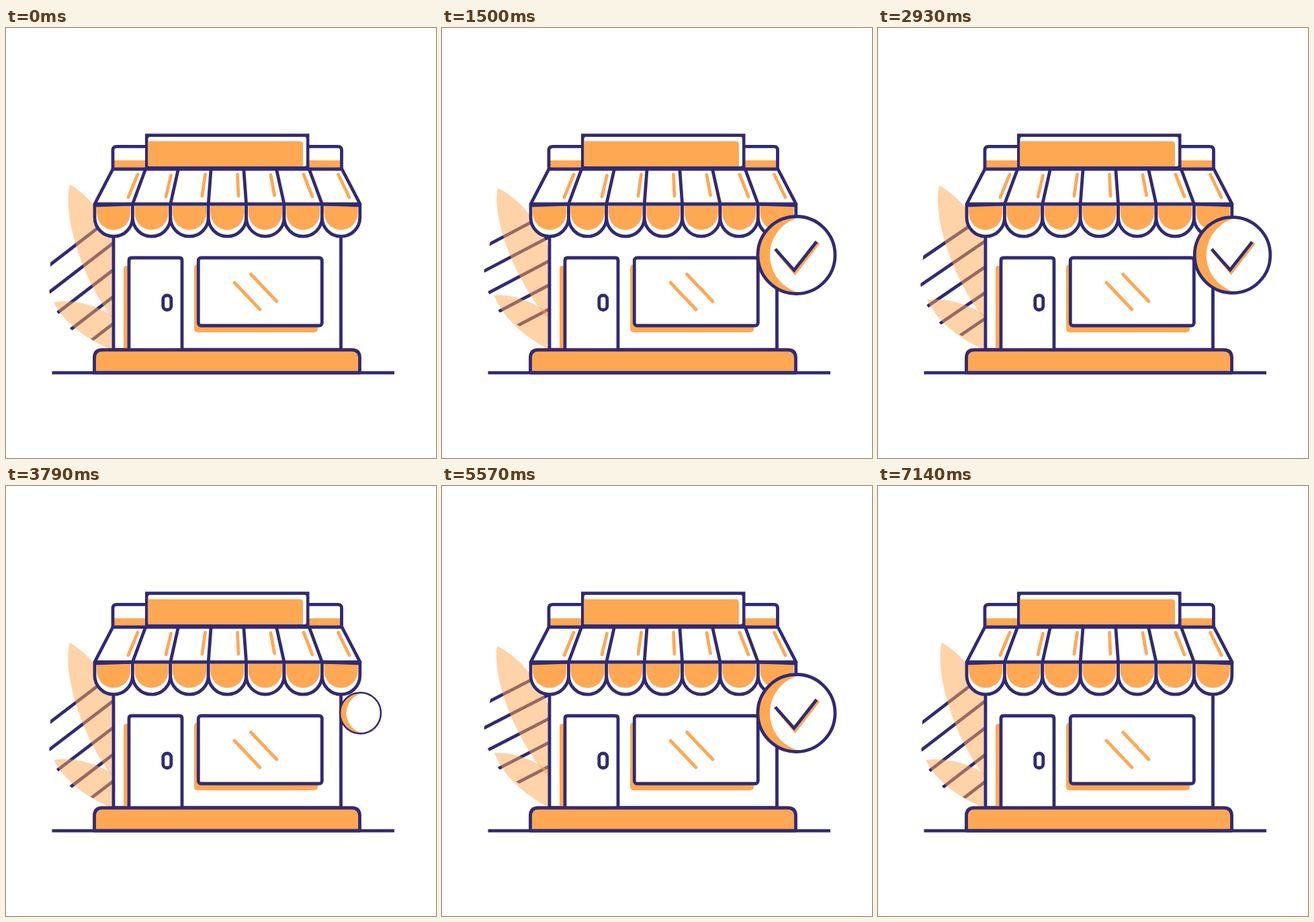
An HTML page for the animation above (7.21 s loop, 640 by 640 pixels).

```html
<!DOCTYPE html>
<html lang="en">
<head>
<meta charset="utf-8">
<title>Shop</title>
<style>
  html, body { margin: 0; width: 100%; height: 100%; overflow: hidden; background: #fff; }
  svg { display: block; width: 100%; height: 100%; }
  .ink { fill: none; stroke: #302a74; stroke-width: 4.8; }
  .paper { fill: #fff; }
  .fill { fill: #ffa853; }
  .shine { fill: none; stroke: #ffa853; stroke-width: 4.8; stroke-linecap: round; }
  .leaf { fill: #ffa853; opacity: .5; }
  .round { stroke-linejoin: round; stroke-linecap: round; }
</style>
</head>
<body>
<svg viewBox="0 0 640 640">
  <defs>
    <clipPath id="hatchClip"><path d="M75 270L66 350L64.5 393L76 423L97 449L129 464.5L220 490V200Z"/></clipPath>
    <clipPath id="badgeClip"><circle cx="527.5" cy="338" r="57"/></clipPath>
  </defs>

  <g id="hatch"><g clip-path="url(#hatchClip)"><path id="hatchLines" class="ink"/></g></g>
  <path id="tallLeaf" class="leaf" d="M95 233C135 255 195 330 170 445C125 400 82 290 95 233Z"/>
  <path id="lowLeaf" class="leaf" d="M71 408C110 402 155 420 180 445L175 486C130 470 90 445 71 408Z"/>

  <!-- Walls, door and window -->
  <path class="ink paper" d="M160 280V479H498.500V280"/>
  <path class="fill" d="M175 479V358Q175 354 179 354H190V479Z"/>
  <path class="ink paper" d="M183 479V346Q183 342 187 342H258Q262 342 262 346V479"/>
  <rect class="ink" x="233.800" y="398" width="12" height="21.500" rx="5.500"/>
  <rect class="fill" x="280" y="352" width="184" height="101" rx="5"/>
  <rect class="ink paper" x="286.300" y="342" width="184" height="101" rx="4"/>
  <path class="shine" d="M340 379L378 419M364.500 366.500L403 407"/>

  <!-- Base -->
  <path class="ink" d="M68.500 513.200H578"/>
  <path class="ink fill round" d="M131.500 513V491Q131.500 479 143.500 479H514.500Q526.500 479 526.500 491V513Z"/>

  <!-- Roof and sign -->
  <path class="paper" d="M159 210V176H500V210Z"/>
  <path class="fill" d="M160 197H499V209H160Z"/>
  <path class="ink" d="M159 210V182Q159 176.300 165 176.300H494Q499.500 176.300 499.500 182V210"/>
  <rect x="207" y="157.300" width="244.500" height="53" fill="#302a74"/>
  <rect class="paper" x="211.500" y="162" width="235.500" height="44" rx="3"/>
  <path class="fill" d="M211.500 168.500H437Q442 168.500 442 173.500V206H211.500Z"/>

  <g id="awning"></g>

  <g id="badge">
    <circle class="fill" cx="527.500" cy="338" r="57"/>
    <circle class="paper" cx="546" cy="338" r="58" clip-path="url(#badgeClip)"/>
    <circle class="ink" cx="527.500" cy="338" r="57.500"/>
    <path class="check shine" style="stroke-linecap:butt" pathLength="1" d="M498.500 332.500L525.500 364.500L560.500 319.500"/>
    <path class="check ink" pathLength="1" d="M496 329L524 360.500L557.500 318"/>
  </g>
</svg>

<script>
const PERIOD = 3605;
const $ = id => document.getElementById(id);
const range = n => [...Array(n).keys()];
const checks = document.querySelectorAll('.check');

// Parallel strokes, 40 apart
$('hatchLines').setAttribute('d',
  range(5).map(i => `M59 ${357.5 + 40 * i}L189 ${257.4 + 40 * i}`).join(''));

function buildAwning() {
  const top = i => 159 + 48.7 * i;
  const bottom = i => 132 + 56.4 * i;
  const shines = [
    [196, 218, 182, 252], [245.5, 219.500, 238, 251], [296.500, 218, 292, 250],
    [344.500, 218, 346, 250], [394, 218.500, 399.500, 249], [443, 218, 456, 251], [494.500, 218, 511, 252]
  ];
  const scallop = (x1, x2, y, r) => `M${x1} 262V${y}A${r} ${r} 0 0 0 ${x2} ${y}V262`;
  const scallops = range(7).map(i => {
    const a = bottom(i), b = bottom(i + 1);
    return `<path class="paper" d="${scallop(a, b, 282, 28.2)}"/>
      <path class="fill" d="${scallop(a + 3.2, b - 3.2, 275.5, 25)}"/>
      <path class="ink" d="${scallop(a, b, 282, 28.2)}"/>`;
  }).join('');
  const dividers = range(6).map(i => `M${top(i + 1)} 210L${bottom(i + 1)} 262`).join('');
  $('awning').innerHTML = scallops +
    `<path class="ink paper round" d="M159 210H500L527 262H132Z"/>
     <path class="ink" d="${dividers}M130.500 264L190 262M468 262L528.500 264"/>
     <path class="shine" d="${shines.map(([a, b, c, d]) => `M${a} ${b}L${c} ${d}`).join('')}"/>`;
}

const ease = u => (1 - Math.cos(Math.PI * Math.min(1, Math.max(0, u)))) / 2;

// Eased interpolation through [time, value] keys
function keyed(t, keys) {
  let value = keys[0][1];
  for (let i = 1; i < keys.length; i++) {
    const [t0, v0] = keys[i - 1], [t1, v1] = keys[i];
    if (t >= t0) value = v0 + (v1 - v0) * ease((t - t0) / (t1 - t0));
  }
  return value;
}

const badgeKeys = [[0, 0], [370, 1.05], [640, 1], [2600, 1], [2870, 1.05], [3235, 0]];

function draw(now) {
  const t = now % PERIOD;
  const sway = (1 - Math.cos(2 * Math.PI * t / PERIOD)) / 2;
  const turn = (id, angle, x, y) =>
    $(id).setAttribute('transform', `rotate(${angle * sway} ${x} ${y})`);
  turn('hatch', 10.6, 245, 366);
  turn('tallLeaf', -3.7, 170, 440);
  turn('lowLeaf', 6.4, 175, 465);

  const scale = keyed(t, badgeKeys);
  $('badge').style.display = scale > 0.005 ? '' : 'none';
  $('badge').setAttribute('transform',
    `translate(527.5 338) scale(${scale}) translate(-527.5 -338)`);

  const drawn = ease((t - 400) / 500);
  checks.forEach(path => {
    path.style.display = drawn > 0 ? '' : 'none';
    path.style.strokeDasharray = `${drawn} 2`;
  });
}

buildAwning();
const start = performance.now();
function loop() {
  draw(performance.now() - start);
  requestAnimationFrame(loop);
}
loop();
</script>
</body>
</html>
```
